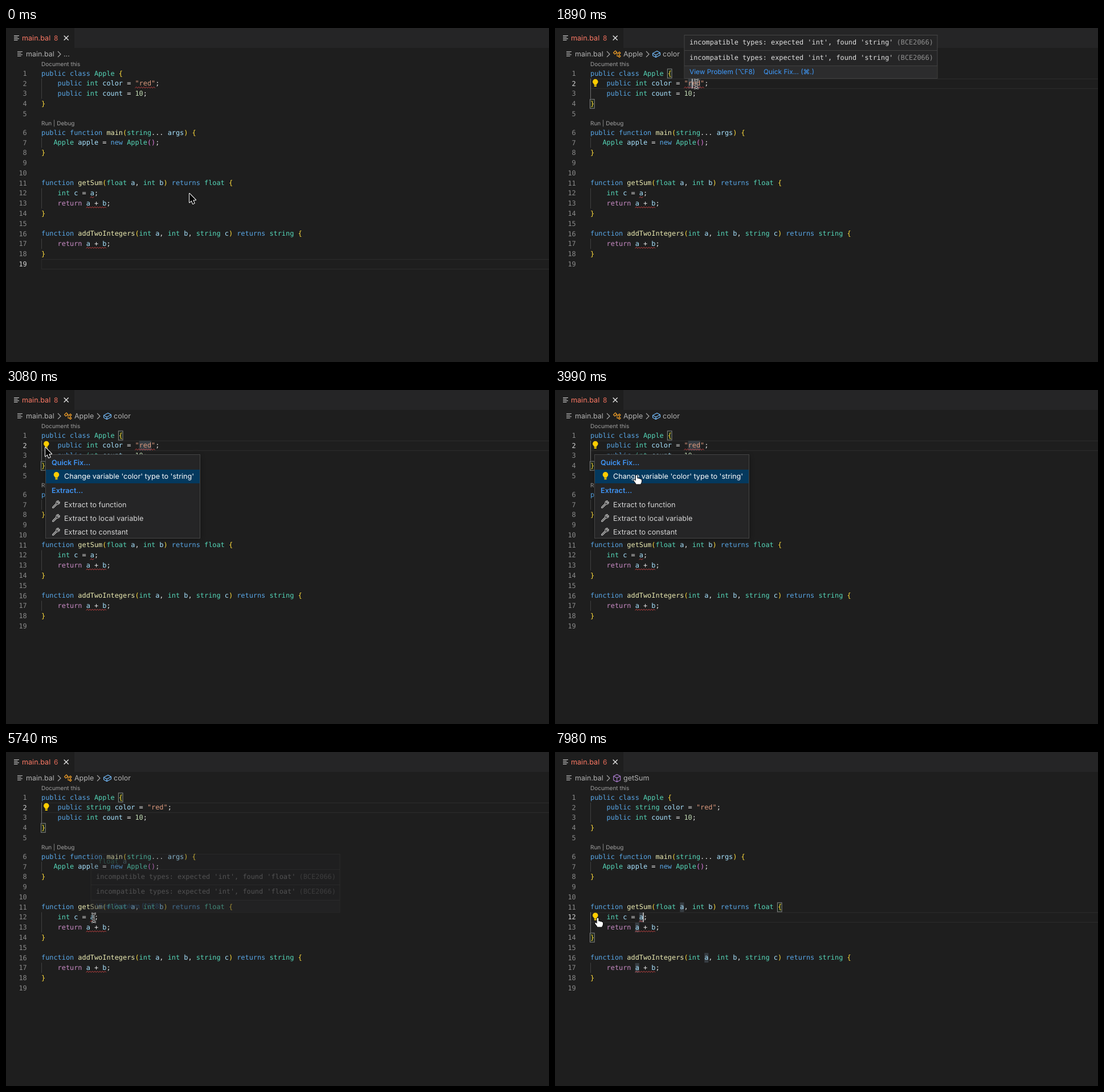
An HTML page with a canvas that plays this animation: 953 by 587 pixels, repeating every 8000 ms.

```html
<!DOCTYPE html>
<html lang="en">
<head>
<meta charset="utf-8">
<title>Editor quick fix</title>
<style>
  html, body { margin: 0; width: 100%; height: 100%; overflow: hidden; background: #1e1e1e; }
  canvas { display: block; }
</style>
</head>
<body>
<canvas width="953" height="587"></canvas>
<script>
const ctx = document.querySelector('canvas').getContext('2d');
ctx.textRendering = 'geometricPrecision';

const LOOP = 8000, STEP = 70;
const LEFT = 62, CHAR = 7.15, ROW = 17.77;
const MONO = '11.88px "DejaVu Sans Mono", monospace';
const ui = (size, weight = 400) => `${weight} ${size}px Inter, "DejaVu Sans", sans-serif`;

const CLICK_RED = 630, MENU_OPEN = 2940, MENU_CLOSE = 4060, FIXED = 4130, CLICK_A = 6650;

const code = [
  'public class Apple {',
  '    public int color = "red";',
  '    public int count = 10;',
  '}',
  '',
  'public function main(string... args) {',
  '   Apple apple = new Apple();',
  '}',
  '',
  '',
  'function getSum(float a, int b) returns float {',
  '    int c = a;',
  '    return a + b;',
  '}',
  '',
  'function addTwoIntegers(int a, int b, string c) returns string {',
  '    return a + b;',
  '}',
  ''
];

const rowY = n => n < 6 ? 80 + (n - 1) * ROW : 184 + (n - 6) * ROW;
const colX = c => LEFT + c * CHAR;

function text(str, x, y, color, font, align = 'left') {
  ctx.font = font;
  ctx.fillStyle = color;
  ctx.textAlign = align;
  ctx.fillText(str, x, y);
}

function box(x, y, w, h, fill, border) {
  if (fill) { ctx.fillStyle = fill; ctx.fillRect(x, y, w, h); }
  if (border) { ctx.strokeStyle = border; ctx.lineWidth = 1; ctx.strokeRect(x, y, w, h); }
}

function shape(path, x, y, { fill, stroke, width = 1 }) {
  const p = new Path2D(path);
  ctx.save();
  ctx.translate(x, y);
  ctx.lineJoin = 'round';
  if (stroke) { ctx.strokeStyle = stroke; ctx.lineWidth = width; ctx.stroke(p); }
  if (fill) { ctx.fillStyle = fill; ctx.fill(p); }
  ctx.restore();
}

function tokenColor(token, next) {
  if (token[0] === '"') return '#dc9a7e';
  if (/^\d/.test(token)) return '#c3dcb4';
  if (/^(public|class|function|returns|new)$/.test(token)) return '#58a6e6';
  if (token === 'return') return '#c98bc5';
  if (/^(int|float|string|Apple)$/.test(token)) return '#55d6b8';
  if (/^\w/.test(token)) return next === '(' ? '#ebebb2' : '#a8e3ff';
  return '#e6e6e6';
}

// Draws one line and returns the bracket depth after it.
function codeLine(line, x, y, depth = 0) {
  for (const m of line.matchAll(/"[^"]*"|\w+|[^\s\w]/g)) {
    const token = m[0];
    if (/[)}]/.test(token)) depth--;
    const color = /[(){}]/.test(token)
      ? ['#ffdc3c', '#e07ade'][depth % 2]
      : tokenColor(token, line[m.index + token.length]);
    text(token, x + m.index * CHAR, y, color, MONO);
    if (/[({]/.test(token)) depth++;
  }
  return depth;
}

function squiggle(row, from, to) {
  const y = rowY(row) + 6.8, start = colX(from), end = colX(to);
  ctx.beginPath();
  for (let x = start, up = 0; x <= end; x += 2.2, up = !up) ctx.lineTo(x, y + (up ? -1.1 : 1.1));
  ctx.strokeStyle = '#f14c4c';
  ctx.lineWidth = .8;
  ctx.stroke();
}

function guide(from, to, active) {
  ctx.fillStyle = active ? '#707070' : '#404040';
  ctx.fillRect(LEFT, rowY(from) - 9, 1, (to - from + 1) * ROW);
}

const wordMark = (row, col, length) =>
  box(colX(col), rowY(row) - 8.5, length * CHAR, 17, 'rgba(80,92,104,.5)');

const bracketMark = (row, col) =>
  box(colX(col) - .5, rowY(row) - 8, CHAR + .5, 16, 'rgba(0,100,0,.1)', '#888');

const caret = (row, col, since, t) => {
  if (Math.floor((t - since) / 490) % 2 === 0) box(colX(col) - .7, rowY(row) - 8.5, 1.6, 17, '#c8c8c8');
};

function bulb(x, y) {
  shape('M-2 4C-2 2-4.8 1-4.8-1.6A4.8 4.8 0 0 1 4.8-1.6C4.8 1 2 2 2 4Z', x, y, { fill: '#ffcc00' });
  box(x - 2, y + 4.6, 4, 2.2, '#ffcc00');
}

function fileIcon(x, y, color) {
  [9, 6.5, 9, 6.5].forEach((w, i) => box(x, y + i * 2.6, w, 1.1, color));
}

const chevron = x => shape('M-2.5-5L2.5 0-2.5 5', x, 46, { stroke: '#a9a9a9', width: 1.1 });

function header(t) {
  box(0, 0, 953, 35, '#252526');
  box(0, 0, 120, 35, '#1e1e1e');
  fileIcon(14, 13, '#c5c5c5');
  text('main.bal', 28, 22.3, '#fa7864', ui(12.6));
  text(t < 4900 ? '8' : '6', 84, 22.3, '#e66c5a', ui(12));
  shape('M-4-4L4 4M4-4L-4 4', 105.7, 17.5, { stroke: '#e8e8e8', width: 1.3 });

  const crumb = (label, x) => text(label, x, 50.4, '#b2b2b2', ui(12.5));
  fileIcon(20, 41, '#b2b2b2');
  crumb('main.bal', 35);
  chevron(93.5);
  if (t < 840) {
    crumb('...', 101);
  } else if (t < CLICK_A + 210) {
    shape('M-6-2L-2.5-5.5 0-3-3.5.5ZM-1.5-1.5H2.5M.5-1.5V4H2.5M2.5-1.5L4.5-3.5 6.5-1.5 4.5.5Z' +
      'M2.5 4L4.5 2 6.5 4 4.5 6Z', 108.5, 45.5, { stroke: '#ee9d28', width: 1.1 });
    crumb('Apple', 120);
    chevron(162.5);
    shape('M-6.5-1L1-5 6.5-2V2L-1 6-6.5 3ZM-6.5-1L-1 2 6.5-2M-1 2V6', 178, 45.5,
      { stroke: '#75beff', width: 1.1 });
    crumb('color', 189);
  } else {
    shape('M0-6.5L6-3.5V3.5L0 6.5-6 3.5V-3.5ZM-6-3.5L0-.5 6-3.5M0-.5V6.5', 108.7, 46,
      { stroke: '#b180d7', width: 1.1 });
    crumb('getSum', 120);
  }
}

function editor(t) {
  const current = t < CLICK_RED ? 19 : t < CLICK_A ? 2 : 12;
  const shift = t < FIXED ? 0 : 3;

  ctx.strokeStyle = '#292929';
  ctx.lineWidth = 1.5;
  ctx.strokeRect(62.5, rowY(current) - 8.3, 900, 17);
  guide(2, 3, current === 2);
  guide(7, 7);
  guide(12, 13, current === 12);
  guide(17, 17);

  if (current === 2) {
    if (t >= 1050 && t < 4480) wordMark(2, 24 + shift, 3);
    bracketMark(1, 19);
    bracketMark(4, 0);
  }
  if (current === 12) {
    [[11, 22], [12, 12], [13, 11], [16, 28], [17, 11]].forEach(([r, c]) => wordMark(r, c, 1));
    bracketMark(11, 46);
    bracketMark(14, 0);
  }

  text('Document this', LEFT, 66.8, '#a0a0a0', ui(10));
  text('Run | Debug', LEFT, 170.8, '#a0a0a0', ui(10));

  let depth = 0;
  code.forEach((line, i) => {
    const row = i + 1, y = rowY(row) + 3.5;
    if (row === 2 && shift) line = line.replace('int', 'string');
    text(row, 36.7, y + .3, row === current ? '#d4d4d4' : '#8a8a8a', MONO, 'right');
    depth = codeLine(line, LEFT, y, depth);
  });

  if (t < 4480) squiggle(2, 23 + shift, 28 + shift);
  squiggle(12, 12, 13);
  squiggle(13, 11, 16);
  squiggle(17, 11, 16);

  const menuOpen = t >= MENU_OPEN && t < MENU_CLOSE;
  if (current === 2 && !menuOpen) caret(2, 25 + shift, t < FIXED ? CLICK_RED : FIXED, t);
  if (current === 12) caret(12, 13, CLICK_A, t);
  if (current === 2 && t >= 1050) bulb(70.8, 96.2);
  if (current === 12 && t >= CLICK_A + 210) bulb(70.8, 288.8);
}

function panel(x, y, w, h, shadow) {
  ctx.save();
  ctx.shadowColor = 'rgba(0,0,0,.4)';
  ctx.shadowBlur = shadow;
  ctx.shadowOffsetY = shadow / 4;
  box(x, y, w, h, '#252526');
  ctx.restore();
  box(x, y, w, h, null, '#454545');
}

function hover({ x, y, w, found, symbol, opacity, quickFix }) {
  if (opacity <= 0) return;
  const pitch = 26.7, rows = symbol ? 3 : 2, foot = y + rows * pitch;
  // Zero-width non-joiners keep the font from raising the brackets around capitals.
  const link = (label, keys, left) =>
    text(`${label} (\u200c${keys}\u200c)`, left, foot + 15.3, '#3f9cff', ui(11.8));
  ctx.save();
  ctx.globalAlpha = Math.min(1, opacity);
  panel(x, y, w, foot + 22.5 - y, 0);
  box(x + .5, foot, w - 1, 22, '#2c2c2d');
  for (let i = 1; i <= rows; i++) box(x, Math.round(y + i * pitch), w, 1, '#414141');
  if (symbol) codeLine(symbol, x + 13, y + 16);
  for (let i = symbol ? 1 : 0; i < rows; i++) {
    const message = `incompatible types: expected 'int', found '${found}'`;
    const base = y + i * pitch + 16.5;
    text(message, x + 9, base, '#e0e0e0', MONO);
    text('(BCE2066)', x + 9 + (message.length + 1) * CHAR - 1, base, '#8f8f8f', MONO);
  }
  link('View Problem', '⌥F8', x + 9);
  if (quickFix) link('Quick Fix...', '⌘.', x + 139);
  ctx.restore();
}

function menu() {
  const item = (label, y, color = '#d6d6d6') => text(label, 102, y + 4.5, color, ui(12.6));
  const heading = (label, y) => text(label, 80, y + 4.5, '#3f94f5', ui(12.6, 600));
  panel(69.5, 113.5, 271, 147, 9);
  box(70, 140, 270, 24, '#04395e');
  heading('Quick Fix...', 127);
  bulb(88.5, 150.5);
  item("Change variable 'color' type to 'string'", 151.7, '#ffffff');
  heading('Extract...', 176);
  ['Extract to function', 'Extract to local variable', 'Extract to constant'].forEach((label, i) => {
    const y = 201 + i * 24;
    shape('M-6 4.5L0-1.5C-.8-4 1.5-7 4.5-6L2-3.5 3.5-2 6-4.5C7-1.5 4 .8 1.5 0L-4.5 6Q-6 7-6.5 5.5Z',
      88, y, { stroke: '#c5c5c5', width: 1.1 });
    item(label, y);
  });
}

// Pointer stops: time, x, y
const stops = [
  [0, 322, 291], [70, 291, 190], [210, 291, 190], [630, 248, 98],
  [1680, 248, 98], [1750, 281, 80], [1820, 281, 80], [1890, 248, 98],
  [2100, 248, 98], [2730, 69, 101], [3220, 69, 101], [3710, 143, 150],
  [4760, 143, 150], [5390, 154, 291], [7070, 154, 291], [7840, 75, 292], [LOOP, 75, 292]
];
// Pointer looks: the time each one ends
const looks = [
  [70, 'arrow'], [1750, 'beam'], [1890, 'arrow'], [2660, 'beam'], [MENU_OPEN, 'hand'],
  [3430, 'arrow'], [MENU_CLOSE, 'hand'], [7700, 'beam'], [LOOP, 'hand']
];

function pointer(t) {
  const i = stops.findIndex(s => s[0] > t);
  const [t0, x0, y0] = stops[i - 1], [t1, x1, y1] = stops[i];
  const p = (t - t0) / (t1 - t0), e = p * p * (3 - 2 * p);
  const x = x0 + (x1 - x0) * e, y = y0 + (y1 - y0) * e;
  const look = looks.find(l => t < l[0])[1];
  if (look === 'arrow') {
    shape('M0 0V15.5L3.6 12.2 6 18 8.6 16.9 6.2 11.3H11Z', x, y,
      { fill: '#000', stroke: '#fff', width: 2 });
  } else if (look === 'hand') {
    shape('M-1.3 1C-1.3-.6 1.3-.6 1.3 1V5.5C3 4.8 4 5.6 4.2 6.2 6 5.6 7 6.4 7.2 7 8.6 6.8 9 7.5 9 8.5' +
      'V11C9 13 7.5 14 7.3 15.5H-.6C-1 13.5-3 12-4.6 9.4-5 8-3.4 7.6-2.4 8.6L-1.3 9.8Z', x, y,
      { fill: '#fff', stroke: '#000', width: 1.6 });
  } else {
    const beam = 'M-4-7.5Q0-7.5 0-5V5Q0 7.5 4 7.5M4-7.5Q0-7.5 0-5M0 5Q0 7.5-4 7.5M-2 2H2';
    shape(beam, x, y + .5, { stroke: '#e8e8e8', width: 2.8 });
    shape(beam, x, y + .5, { stroke: '#111', width: 1.2 });
  }
}

function draw(t) {
  box(0, 0, 953, 587, '#1e1e1e');
  header(t);
  editor(t);
  if (t < 2170) {
    hover({ x: 227, y: 12.5, w: 444, found: 'string', opacity: (t - 1050) / 125, quickFix: true });
  }
  if (t < CLICK_A) {
    hover({ x: 149, y: 179.5, w: 437, found: 'float', symbol: 'float a',
      opacity: (t - 5707) / 125, quickFix: t >= 5880 });
  }
  if (t >= MENU_OPEN && t < MENU_CLOSE) menu();
  pointer(t);
}

const start = performance.now();
function tick() {
  const t = (performance.now() - start) % LOOP;
  draw(Math.floor(t / STEP) * STEP);
  requestAnimationFrame(tick);
}
tick();
</script>
</body>
</html>
```
